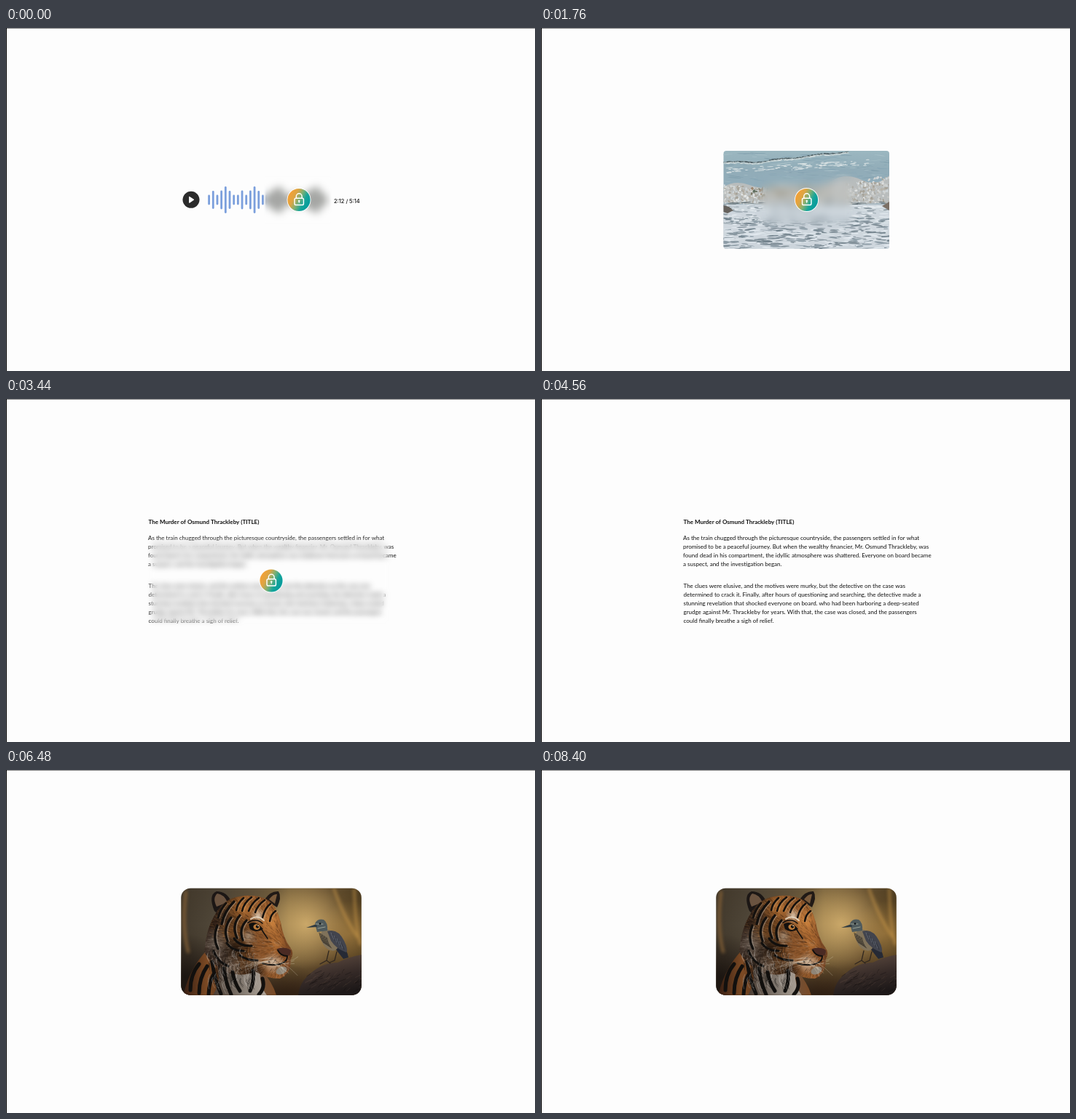
Recreate the animation shown at these times as an HTML page with a canvas. Size 726 by 472 pixels, loop 8.48 s.

```html
<!DOCTYPE html>
<html lang="en">
<head>
<meta charset="utf-8">
<title>Unlocking media</title>
<style>
html, body { margin: 0; width: 100%; height: 100%; overflow: hidden; background: #fdfdfd; }
canvas { display: block; }
</style>
</head>
<body>
<canvas id="stage" width="726" height="472"></canvas>
<script>
const W = 726, H = 472, LOOP = 8480, STEP = 80, BG = '#fdfdfd';
const stage = document.getElementById('stage').getContext('2d');

function rng(seed) {
  return () => {
    seed = (seed * 1664525 + 1013904223) >>> 0;
    return seed / 4294967296;
  };
}

function layer(draw) {
  const canvas = document.createElement('canvas');
  canvas.width = W;
  canvas.height = H;
  draw(canvas.getContext('2d'));
  return canvas;
}

function roundRect(c, x, y, w, h, r) {
  c.beginPath();
  c.roundRect(x, y, w, h, r);
}

function disc(c, x, y, r, fill) {
  c.beginPath();
  c.arc(x, y, r, 0, 7);
  c.fillStyle = fill;
  c.fill();
}

function oval(c, x, y, rx, ry, angle, fill) {
  c.beginPath();
  c.ellipse(x, y, rx, ry, angle, 0, 7);
  c.fillStyle = fill;
  c.fill();
}

function shape(c, path, fill) {
  c.fillStyle = fill;
  c.fill(new Path2D(path));
}

function line(c, path, color, width) {
  c.strokeStyle = color;
  c.lineWidth = width;
  c.stroke(new Path2D(path));
}

function gradient(c, coords, ...colors) {
  const g = coords.length === 4 ? c.createLinearGradient(...coords) : c.createRadialGradient(...coords);
  colors.forEach((color, i) => g.addColorStop(i / (colors.length - 1), color));
  return g;
}

function blob(c, x, y, r, inner, outer) {
  c.fillStyle = gradient(c, [x, y, 0, x, y, r], inner, outer);
  c.fillRect(x - r, y - r, 2 * r, 2 * r);
}

// Soft spot of light or shade
function glow(c, x, y, r, rgb, alpha) {
  blob(c, x, y, r, `rgba(${rgb},${alpha})`, `rgba(${rgb},0)`);
}

// Blurred copy of a scene, kept only inside a feathered mask
function veil(scene, blur, feather, mask) {
  return layer(c => {
    c.filter = `blur(${blur}px)`;
    c.drawImage(scene, 0, 0);
    c.globalCompositeOperation = 'destination-in';
    c.filter = 'none';
    c.drawImage(layer(m => {
      m.filter = `blur(${feather}px)`;
      mask(m);
    }), 0, 0);
  });
}

function badge(c, x, y, r, alpha) {
  if (alpha <= 0) return;
  c.save();
  c.globalAlpha = alpha;
  c.translate(x, y);
  c.scale(r / 36, r / 36);
  disc(c, 0, 0, 36, '#fff');
  disc(c, 0, 0, r > 20 ? 34.6 : 34, gradient(c, [-28, -14, 28, 14], '#f1a137', '#dca544', '#7db074', '#17a59a', '#079c9c'));
  c.lineWidth = r > 20 ? 2.6 : 3.2;
  c.strokeStyle = '#fff';
  roundRect(c, -13, -5, 27, 20.5, 4);
  c.stroke();
  line(c, 'M-8 -5V-10.5A8.5 8.5 0 0 1 9 -10.5V-5', '#fff', c.lineWidth);
  disc(c, .5, 3, 2.7, '#fff');
  c.fillRect(-.8, 3, 2.6, 6.5);
  c.restore();
}

function playButton(c, x, y, r, fill) {
  disc(c, x, y, r, fill);
  c.lineJoin = 'round';
  const s = r / 12, path = new Path2D(`M${x - 2.4 * s} ${y - 4 * s}L${x + 3.6 * s} ${y}L${x - 2.4 * s} ${y + 4 * s}Z`);
  c.fillStyle = c.strokeStyle = '#fff';
  c.lineWidth = 1.2;
  c.fill(path);
  c.stroke(path);
}

function drawAudio(c) {
  c.fillStyle = BG;
  c.fillRect(0, 0, W, H);
  playButton(c, 254, 236.3, 11.5, '#2b2b2b');
  const heights = [14, 25, 14, 26, 37, 25, 14, 14, 26, 14, 26, 37, 25, 14,
    14, 25, 31, 37, 26, 14, 14, 25, 14, 14, 26, 31, 37, 26, 14];
  heights.forEach((h, i) => {
    c.fillStyle = i < 14 ? '#7b9fdc' : '#4a4d48';
    roundRect(c, 277.2 + i * 5.68, 236.5 - h / 2, 2.8, h, 1.4);
    c.fill();
  });
  c.fillStyle = '#111';
  c.font = '500 7.4px Inter, sans-serif';
  c.fillText('2:12 / 5:14', 450, 240.6);
}

function drawSea(c) {
  const rand = rng(11);
  const pick = list => list[Math.floor(rand() * list.length)];
  c.fillStyle = BG;
  c.fillRect(0, 0, W, H);
  c.save();
  roundRect(c, 250.5, 169, 227.5, 135, 4);
  c.clip();
  c.fillStyle = gradient(c, [0, 169, 0, 304], '#9bb7c0', '#91acb8', '#91adbb', '#aebbc2', '#b7c1c8', '#aab5bd');
  c.fillRect(250, 169, 228, 135);

  const specks = (n, y0, y1, w, h, colors) => {
    for (let i = 0; i < n; i++) {
      const y = y0 + rand() * (y1 - y0);
      oval(c, 250 + rand() * 228, y, w * (.3 + rand()), h * (.4 + rand()), (rand() - .5) * .3, pick(colors));
    }
  };
  specks(130, 172, 212, 9, .4, ['#7f9dab', '#a9c0c8', '#86a5b4']);
  for (let x = 250; x < 422; x += 1.5) {
    const y = 185 - Math.max(0, x - 295) * .115 + Math.sin(x / 9) * .8;
    oval(c, x, y + rand() * 2, 2.5, .6, -.1, pick(['#d5dddd', '#b9c9cc']));
    oval(c, x, y - 1 + rand(), 1.8, .6, -.1, pick(['#3d4b50', '#5d6d70', '#899da2']));
  }
  for (let i = 0; i < 95; i++) {
    const x = 255 + rand() * 195;
    oval(c, x, 197 - (x - 250) * .06 + (rand() - .5) * 8, 1 + rand() * 4, .5, -.06, '#dce4e5');
  }

  shape(c, 'M250 219Q266 209 286 216T325 219T365 217T402 209T440 209T478 203V240Q364 248 250 240Z', '#b9bdbd');
  for (let i = 0; i < 800; i++) {
    const x = 250 + rand() * 228;
    const top = 218 + Math.sin(x / 11) * 2 - Math.max(0, x - 375) * .12;
    oval(c, x, top + rand() * (241 - top), .6 + rand() * 2, .5 + rand() * 1.3, rand() * 3,
      pick(['#e3e5e4', '#d0d2d0', '#b6b2a8', '#c7c8c5', '#a6a298', '#ced5d8']));
  }
  for (let i = 0; i < 85; i++) {
    const x = 285 + rand() * 110;
    oval(c, x, 219 + rand() * 13, .6 + rand() * 1.4, .8 + rand() * 1.5, .3, pick(['#7f7b67', '#8e9580', '#9d8770', '#5f6d5e']));
  }
  specks(45, 239, 243, 6, .6, ['#54636a', '#7b898f', '#99a4a9']);

  c.fillStyle = 'rgba(214,222,229,.78)';
  c.fillRect(250, 243, 228, 61);
  specks(220, 243, 268, 5, .8, ['#8c9aa2', '#a1adb5', '#e7edf1', '#dfe6eb']);
  specks(480, 261, 306, 7, .9, ['#74848e', '#84929b', '#8f9ea8', '#e1e8ee', '#dae2e8']);
  shape(c, 'M250 244l8 2 6 5-8 4-6-2Z', '#66625d');
  shape(c, 'M468 245l10-6v12Z', '#7c7065');
  c.restore();
}

function drawBird(c) {
  line(c, 'M443 249L440 262L431 267M440 262L445 266M454 250L451 262L444 265', '#30271f', 1.3);
  shape(c, 'M459 238Q469 249 470 258L463 260L452 246Z', '#262a35');
  oval(c, 444, 234, 16, 10.5, 1, '#80725a');
  shape(c, 'M441 222Q455 217 464 235Q470 247 467 251Q453 246 446 235Z', '#42444d');
  shape(c, 'M424 211Q428 204 436 206Q442 210 441 221L427 223Z', '#4f5a5c');
  shape(c, 'M426 212L412 217L427 216Z', '#303b42');
  line(c, 'M425 212H435M428 218L438 216', '#a3aa9b', .9);
  disc(c, 431, 211.5, 1.3, '#101315');
  for (let i = 0; i < 8; i++) {
    line(c, `M${430 + i * 1.5} ${224 + i}q1 8 6 14`, '#39342c', .8);
    line(c, `M${446 + i * 2} ${224 + i * 2}l4 9`, i % 2 ? '#272b35' : '#6d727d', .8);
  }
}

function drawTiger(c, withBird) {
  const rand = rng(5);
  const ink = '#12100e', shade = '24,17,12', white = '226,216,200', amber = '190,118,54';
  c.fillStyle = BG;
  c.fillRect(0, 0, W, H);
  c.save();
  roundRect(c, 240.3, 162.7, 247.5, 147, 13);
  c.clip();
  c.lineCap = 'round';

  // Backdrop and rock
  c.fillStyle = gradient(c, [240, 0, 488, 0], '#42392c', '#51483a', '#6b5a3f', '#8f7444', '#7a5f36', '#54401f');
  c.fillRect(240, 162, 249, 149);
  c.fillStyle = gradient(c, [0, 163, 0, 310], 'rgba(60,50,36,.3)', 'rgba(60,50,36,0)', 'rgba(40,26,16,.25)', 'rgba(32,20,14,.85)');
  c.fillRect(240, 162, 249, 149);
  glow(c, 412, 212, 62, '214,178,112', .85);
  glow(c, 472, 225, 45, '196,150,78', .5);
  glow(c, 246, 285, 60, '22,17,14', .8);
  glow(c, 388, 312, 45, '45,28,16', .7);
  c.filter = 'blur(2px)';
  line(c, 'M247 168Q241 215 250 250', '#7d5c35', 4);
  line(c, 'M450 163Q464 205 486 235M478 164Q479 210 486 240', 'rgba(214,160,78,.6)', 3);
  c.filter = 'none';
  shape(c, 'M401 310Q403 291 419 279Q435 265 455 265Q470 257 489 254V311H401Z',
    gradient(c, [440, 260, 450, 308], '#54433a', '#352a27', '#1d1818'));
  for (let i = 0; i < 60; i++) {
    const x = 410 + rand() * 78, y = 277 + rand() * 30;
    line(c, `M${x} ${y}l${3 + rand() * 7} ${-2 - rand() * 4}`, i % 2 ? 'rgba(112,87,72,.22)' : 'rgba(14,11,11,.35)', 1);
  }

  // Body and ears
  shape(c, 'M243 310Q254 266 284 240L350 275Q366 292 371 310Z', gradient(c, [245, 0, 370, 0], '#3a2013', '#7c4a24', '#4c2e1b', '#6a5442', '#7a4a25'));
  shape(c, 'M297 268L349 274Q347 296 358 310H284Q296 290 290 271Z', gradient(c, [285, 0, 357, 0], '#4b3d33', '#7d746b', '#b0a69b'));
  shape(c, 'M286 194Q277 172 289 167Q303 167 309 181L297 203Z', '#1c1715');
  shape(c, 'M289 188Q283 176 290 170Q299 171 304 182Z', '#6a5340');
  shape(c, 'M355 178Q363 166 374 167Q379 175 372 189Z', '#211a16');
  shape(c, 'M361 178Q367 170 372 171L369 184Z', '#7a5a3b');

  // Head, lit from the right
  const head = 'M288 197Q299 177 321 174Q345 170 361 180Q372 189 377 210Q381 233 390 244Q396 252 391 260Q391 281 376 287Q357 287 342 277Q329 284 307 280Q281 268 272 250Q275 217 288 197Z';
  shape(c, head, gradient(c, [274, 236, 392, 226], '#2c1d14', '#38271b', '#593619', '#87532a', '#985c2c', '#6e3f20'));
  c.save();
  c.clip(new Path2D(head));
  glow(c, 326, 189, 26, amber, .85);
  glow(c, 363, 208, 24, '208,134,64', .9);
  glow(c, 370, 236, 17, amber, .7);
  glow(c, 306, 226, 24, amber, .4);
  glow(c, 288, 240, 26, '150,140,130', .55);
  glow(c, 308, 272, 22, '150,140,130', .5);
  glow(c, 313, 245, 20, shade, .75);
  glow(c, 346, 200, 11, white, .75);
  glow(c, 333, 229, 11, white, .5);
  glow(c, 366, 266, 16, white, .65);
  glow(c, 340, 280, 21, shade, .85);
  // Fur runs outwards from the nose
  for (let i = 0; i < 1500; i++) {
    const x = 272 + rand() * 118, y = 174 + rand() * 112;
    const angle = Math.atan2(y - 246, x - 388) + (rand() - .5) * .5, len = 2 + rand() * 5;
    const pale = y > 232 ? 'rgba(205,196,184,.22)' : 'rgba(220,145,70,.25)';
    line(c, `M${x} ${y}l${Math.cos(angle) * len} ${Math.sin(angle) * len}`, i % 3 ? 'rgba(20,13,9,.3)' : pale, .7);
  }
  c.restore();

  // Stripes with paler fur beside them
  c.filter = 'blur(.5px)';
  const crown = 'M326 176Q317 184 316 193M337 175Q326 183 324 194M347 176Q337 183 333 194M355 179Q345 186 342 196M363 184Q355 190 352 203M370 194Q363 199 362 208M302 183Q294 192 291 203';
  const cheek = 'M313 181Q299 195 296 212M309 203Q297 218 304 235M321 200Q309 214 317 231M330 207Q319 219 325 234M290 214Q283 231 291 246M303 238Q310 249 326 249M313 232Q321 243 337 242M285 249Q290 264 305 270M321 255Q330 262 345 262';
  c.save();
  c.translate(2.4, .8);
  line(c, crown, 'rgba(232,196,148,.35)', 1.2);
  line(c, cheek, 'rgba(214,205,192,.4)', 1.4);
  c.restore();
  line(c, crown, ink, 2.4);
  line(c, cheek, ink, 3.2);
  line(c, 'M253 303Q253 281 265 267M265 307Q265 286 276 270M278 309Q279 290 286 279M295 308Q286 288 283 264M309 309Q301 292 299 273M321 304Q313 292 311 278M335 304Q341 291 339 276M347 309Q356 300 352 287', ink, 5);
  c.filter = 'none';
  for (let i = 0; i < 140; i++) {
    const x = 276 + rand() * 70, y = 242 + rand() * 52;
    line(c, `M${x} ${y}q-3 5 ${rand() * 6 - 2} ${6 + rand() * 9}`, i % 2 ? 'rgba(212,208,202,.35)' : 'rgba(16,13,12,.5)', .8);
  }

  // Face details
  shape(c, 'M333 212Q343 206 353 219Q343 225 335 219Z', ink);
  oval(c, 344, 216, 4.6, 3.9, .2, '#b9793a');
  disc(c, 345, 215.6, 2.1, '#0c0d0c');
  disc(c, 346, 214.5, .7, '#fff');
  line(c, 'M332 210Q343 203 352 211M351 220Q355 226 359 232', ink, 1.6);
  line(c, 'M336 205Q345 199 354 207', 'rgba(238,226,206,.75)', 2.2);
  shape(c, 'M372 246Q382 243 390 247Q393 252 386 257Q375 256 372 246Z', '#4a2a23');
  line(c, 'M373 248Q377 256 386 256M386 257Q386 264 376 267Q364 270 352 266', ink, 1.9);
  oval(c, 378, 276, 8, 5, -.4, '#8f8577');
  for (let i = 0; i < 14; i++) {
    const x = 360 + rand() * 19, y = 257 + rand() * 10;
    disc(c, x, y, .6, '#3a3029');
    line(c, `M${x} ${y}q-16 1 ${-26 - rand() * 22} ${i}`, 'rgba(235,228,214,.4)', .5);
    line(c, `M${x + 8} ${y + 3}q6 2 ${8 + rand() * 11} ${-7 + i * 2}`, 'rgba(240,230,210,.5)', .5);
  }
  if (withBird) drawBird(c);
  c.restore();
}

function drawStory(c) {
  c.fillStyle = BG;
  c.fillRect(0, 0, W, H);
  c.fillStyle = '#111';
  c.font = 'bold 8px Lato, sans-serif';
  c.fillText('The Murder of Osmund Thrackleby (TITLE)', 195.5, 171.7);
  c.font = '8px Lato, sans-serif';
  const paragraph = (x, y, lines) => lines.forEach((text, i) => c.fillText(text, x, y + i * 12));
  paragraph(195, 193.6, [
    'As the train chugged through the picturesque countryside, the passengers settled in for what',
    'promised to be a peaceful journey. But when the wealthy financier, Mr. Osmund Thrackleby, was',
    'found dead in his compartment, the idyllic atmosphere was shattered. Everyone on board became',
    'a suspect, and the investigation began.'
  ]);
  paragraph(195.5, 259.6, [
    'The clues were elusive, and the motives were murky, but the detective on the case was',
    'determined to crack it. Finally, after hours of questioning and searching, the detective made a',
    'stunning revelation that shocked everyone on board. who had been harboring a deep-seated',
    'grudge against Mr. Thrackleby for years. With that, the case was closed, and the passengers',
    'could finally breathe a sigh of relief.'
  ]);
}

const audio = layer(drawAudio), sea = layer(drawSea), story = layer(drawStory);
const tiger = layer(c => drawTiger(c, true));
const tigerAlone = layer(c => drawTiger(c, false));

const scenes = [
  { start: 0, unlock: [320, 960], image: audio, lock: [402, 236.5, 16.5],
    veil: veil(audio, 5.5, 1, c => c.fillRect(355.5, 205, 90, 63)) },
  { start: 1760, unlock: [2000, 2640], image: sea, lock: [364.5, 236.5, 16.5], play: true,
    veil: veil(sea, 6, 4, c => c.fillRect(303, 204, 123, 67)) },
  { start: 3440, unlock: [3760, 4560], image: story, lock: [364, 250, 16.5],
    veil: veil(story, 4, 4, c => c.fillRect(200, 196, 323, 111)) },
  { start: 5280, unlock: [5680, 6160], image: tiger, lock: [444.3, 236, 36.5], glow: true,
    veil: veil(tigerAlone, 2, 3, c => {
      roundRect(c, 403, 196, 82, 79, 32);
      c.fill();
    }) }
];

function ease(t, [from, to]) {
  const p = Math.min(1, Math.max(0, (t - from) / (to - from)));
  return p < .5 ? 4 * p ** 3 : 1 - (2 - 2 * p) ** 3 / 2;
}

function drawHalo(c, alpha) {
  c.save();
  c.globalAlpha = alpha;
  c.beginPath();
  c.rect(0, 0, W, H);
  c.roundRect(240.3, 162.7, 247.5, 147, 13);
  c.clip('evenodd');
  blob(c, 444, 236, 106, 'rgba(230,178,145,.32)', 'rgba(245,220,205,0)');
  disc(c, 444, 236, 85, 'rgba(240,205,190,.07)');
  c.restore();
}

function render(t) {
  const scene = scenes.findLast(s => t >= s.start);
  const open = ease(t, scene.unlock), [x, y, r] = scene.lock;
  stage.drawImage(scene.image, 0, 0);
  if (open < 1) {
    stage.save();
    stage.globalAlpha = 1 - open;
    if (scene.glow) {
      roundRect(stage, 240.3, 162.7, 247.5, 147, 13);
      stage.clip();
    }
    stage.drawImage(scene.veil, 0, 0);
    stage.restore();
    if (scene.glow) drawHalo(stage, 1 - open);
  }
  badge(stage, x, y, scene.play ? r - 3 * open : r, 1 - open);
  if (scene.play && open > 0) {
    stage.save();
    stage.globalAlpha = open;
    disc(stage, x, y, r - 3.2 * open, '#f7ddd8');
    playButton(stage, x, y, r - 4.2 * open, '#ef5a5c');
    stage.restore();
  }
  stage.fillStyle = '#8c8c8c';
  stage.fillRect(0, 0, W, 1);
  stage.fillStyle = '#000';
  stage.fillRect(0, 0, 1, H);
}

const begin = performance.now();
function tick() {
  const t = (performance.now() - begin) % LOOP;
  render(Math.floor(t / STEP) * STEP);
  requestAnimationFrame(tick);
}
tick();
</script>
</body>
</html>
```
